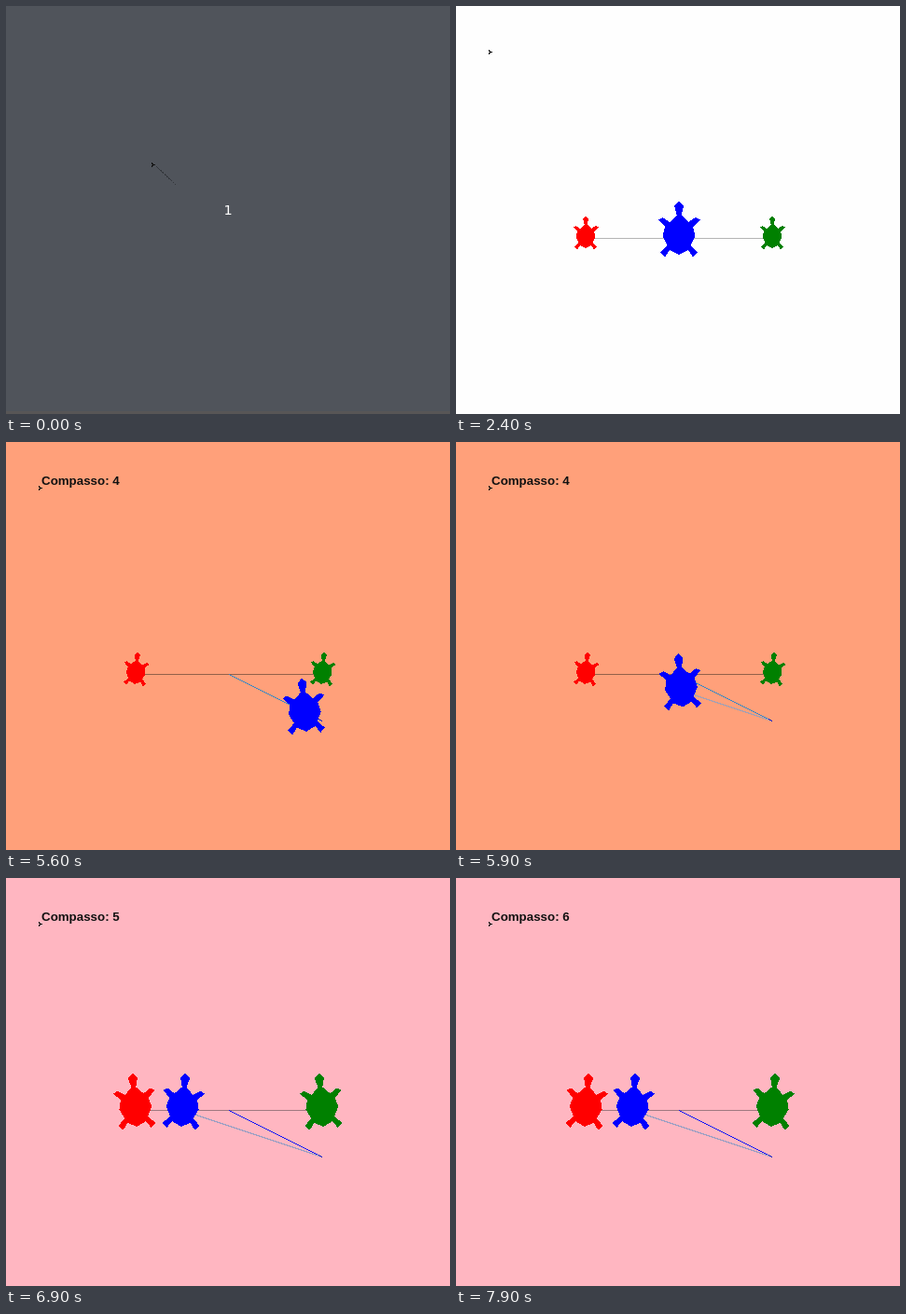
An HTML page that plays this animation: 476 by 438 pixels, repeating every 8 s.

```html
<!DOCTYPE html>
<html lang="pt">
<head>
<meta charset="utf-8">
<title>Compasso</title>
<style>
  html, body { margin: 0; width: 100%; height: 100%; overflow: hidden; background: #fefefe; }
  svg { display: block; width: 476px; height: 438px; shape-rendering: crispEdges; }
  #label { font: bold 13.333px "Liberation Sans", Arial, sans-serif; fill: #111; }
  #count { font: 14.5px "DejaVu Sans", sans-serif; fill: #fff; text-anchor: middle; }
</style>
</head>
<body>
<svg viewBox="0 0 476 438">
  <defs>
    <polygon id="turtle" points="0,-16 -2,-14 -1,-10 -4,-7 -7,-9 -9,-8 -6,-5 -7,-1 -5,3 -8,6 -6,8 -4,5 0,7 4,5 6,8 8,6 5,3 7,-1 6,-5 9,-8 7,-9 4,-7 1,-10 2,-14"/>
  </defs>
  <rect id="back" width="476" height="438"/>
  <g id="intro">
    <rect y="435" width="476" height="3" fill="#585656"/>
    <path d="M159 170L182 192" stroke="#34373c" stroke-dasharray="2 1"/>
    <text id="count" x="238" y="224">1</text>
  </g>
  <g id="scene">
    <path id="base" d="M139 249.5H339"/>
    <line id="leg1" x1="239" y1="249.5"/>
    <line id="leg2" x1="339" y1="299.5"/>
    <path id="corner" d="M335 297.5L339 299.5" stroke="#0000c8"/>
    <use id="red" href="#turtle" fill="#f00"/>
    <use id="green" href="#turtle" fill="#008000"/>
    <use id="blue" href="#turtle" fill="#00f"/>
  </g>
  <polygon id="arrow" points="0,0 -5,-3 -3.5,0 -5,3" fill="#111"/>
  <text id="label" x="38" y="46"></text>
</svg>
<script>
const LOOP = 8000, TICK = 100;
const el = id => document.getElementById(id);
const clamp = v => Math.max(0, Math.min(1, v));
const mix = (a, b, p) => a + (b - a) * p;
const set = (id, attrs) => {
  for (const k in attrs) el(id).setAttribute(k, attrs[k]);
};
const show = (id, on) => set(id, { visibility: on ? 'visible' : 'hidden' });

// Value of the last [time, value] pair already reached.
const at = (list, t) => list.reduce((v, [time, next]) => t >= time ? next : v, list[0][1]);

const THEMES = {
  dark:   { back: '#50545b', base: '#333',    leg1: '#00f',    leg2: '#00f' },
  white:  { back: '#fefefe', base: '#b4b4b4', leg1: '#5aaef5', leg2: '#9cc4ee' },
  salmon: { back: '#ffa07a', base: '#936049', leg1: '#3c86c8', leg2: '#a4a0b4' },
  yellow: { back: '#ffffe0', base: '#b8b8a4', leg1: '#4aa6fa', leg2: '#9cc0dc' },
  pink:   { back: '#ffb6c1', base: '#a07880', leg1: '#1010f8', leg2: '#9a9fc4' }
};
const themes = [[0, 'dark'], [100, 'white'], [5300, 'salmon'], [6500, 'yellow'],
  [6900, 'pink'], [7200, 'yellow'], [7800, 'pink']];
const labels = [[0, ''], [1400, 0], [2400, ''], [2500, 1], [3500, 2], [4500, 3],
  [5500, 4], [6500, 5], [7500, 6]];

// Swaying heads, in degrees
const redTilt = [[0, 0], [5300, -5], [5400, 5], [6200, -5], [6600, 5],
  [6900, -5], [7200, 5], [7500, -5], [7800, 5]];
const greenTilt = [[0, 0], [5300, -5], [5500, 5], [6300, -5], [6600, 5],
  [6900, -5], [7200, 5], [7500, -5], [7800, 5]];
const blueTilt = [[0, 0], [5300, -5], [6700, 5], [7000, -5], [7300, 5],
  [7600, -5], [7900, 5]];
const sizes = [[0, 1.5], [6600, 2.5]];

function place(id, x, y, turn, size) {
  set(id, { transform: `translate(${x} ${y}) rotate(${turn}) scale(${size})` });
}

function draw(t) {
  const theme = THEMES[at(themes, t)];
  set('back', { fill: theme.back });
  for (const id of ['base', 'leg1', 'leg2']) set(id, { stroke: theme[id] });

  show('intro', t < 100);
  show('scene', t >= 400);

  const p = clamp(t / 300);
  set('arrow', { transform: `translate(${mix(160, 39, p)} ${mix(170.5, 49.5, p)})` });

  const out = clamp((t - 3200) / 400), back = clamp((t - 5530) / 570);
  const x1 = mix(239, 339, out), y1 = mix(249.5, 299.5, out);
  const x2 = mix(339, 189, back), y2 = mix(299.5, 249.5, back);
  set('leg1', { x2: x1, y2: y1 });
  set('leg2', { x2, y2 });
  for (const id of ['leg2', 'corner']) show(id, back > 0);

  const size = at(sizes, t);
  place('red', 139, 249.5, at(redTilt, t), size);
  place('green', 339, 249.5, at(greenTilt, t), size);
  const rise = 90 * (1 - clamp((t - 400) / 1000));
  place('blue', back ? x2 : x1, back ? y2 : y1, rise + at(blueTilt, t), 2.5);

  const n = at(labels, t);
  el('label').textContent = n === '' ? '' : 'Compasso: ' + n;
}

const start = performance.now();
function frame() {
  const t = (performance.now() - start) % LOOP;
  draw(Math.floor(t / TICK) * TICK);
  requestAnimationFrame(frame);
}
frame();
</script>
</body>
</html>
```
